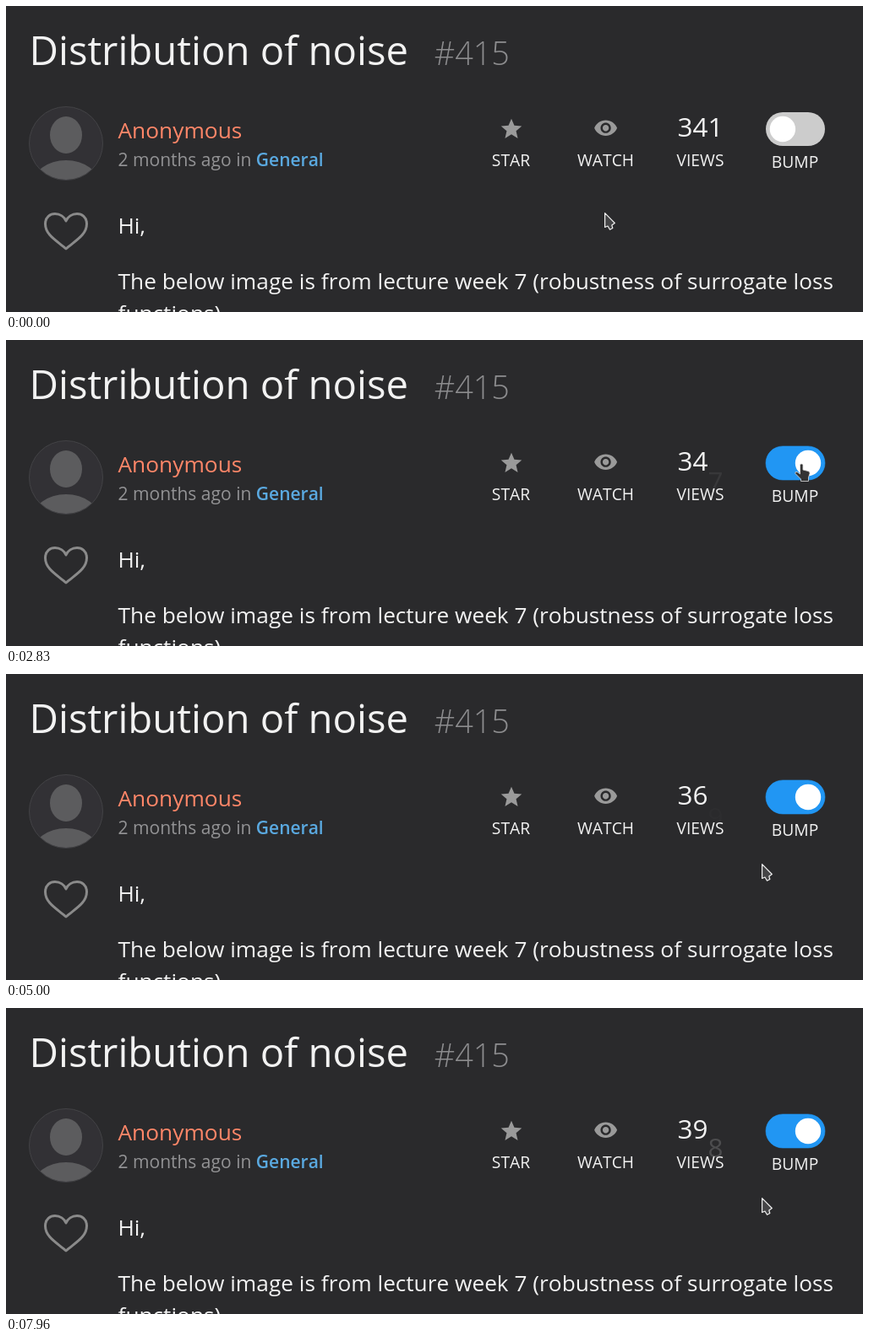
These frames come from a looping animation (1014 by 363 pixels, 8 s). An HTML page:

```html
<!DOCTYPE html>
<html lang="en">
<head>
<meta charset="utf-8">
<title>Distribution of noise</title>
<style>
  html, body { margin: 0; width: 100%; height: 100%; overflow: hidden; background: #2a2a2c; }
  svg { display: block; width: 1014px; height: 363px; }
  text { font-family: "Open Sans", sans-serif; font-kerning: none; fill: #f2f2f2; }
  .title { font-size: 47.25px; }
  .id { font-size: 37.8px; font-weight: 300; fill: #8c8c8e; }
  .body { font-size: 26.25px; }
  .author { fill: #ff8668; }
  .meta { font-size: 21px; fill: #939395; }
  .topic { font-weight: 600; fill: #5aa9e0; }
  .label { font-size: 19.25px; text-anchor: middle; }
  .count { font-size: 31.5px; }
  .icon { fill: #9a9a9a; }
</style>
</head>
<body>
<svg viewBox="0 0 1014 363">
  <defs>
    <clipPath id="round"><circle cx="71" cy="163" r="43"/></clipPath>
  </defs>

  <text class="title" x="27.5" y="70">Distribution of noise</text>
  <text class="id" x="506.8" y="70">#415</text>

  <circle cx="71" cy="163" r="43.5" fill="#323135" stroke="#434346"/>
  <g fill="#5c5c5e" clip-path="url(#round)">
    <ellipse cx="71" cy="153" rx="19" ry="22"/>
    <ellipse cx="71" cy="213" rx="40" ry="30"/>
  </g>
  <text class="body author" x="132.5" y="157">Anonymous</text>
  <text class="meta" x="132.5" y="190">2 months ago in <tspan class="topic">General</tspan></text>

  <path class="icon" transform="translate(583.3 131.2) scale(1.225)"
    d="M12 17.27L18.18 21l-1.64-7.03L22 9.24l-7.19-.61L12 2 9.19 8.63 2 9.24l5.46 4.73L5.82 21z"/>
  <path class="icon" transform="translate(694.9 130) scale(1.225)"
    d="M12 4.5C7 4.5 2.73 7.61 1 12c1.73 4.39 6 7.5 11 7.5s9.27-3.11 11-7.5c-1.73-4.39-6-7.5-11-7.5zM12 17c-2.76 0-5-2.24-5-5s2.24-5 5-5 5 2.24 5 5-2.24 5-5 5zm0-8c-1.66 0-3 1.34-3 3s1.34 3 3 3 3-1.34 3-3-1.34-3-3-3z"/>
  <text class="label" x="597.5" y="190">STAR</text>
  <text class="label" x="709.5" y="190">WATCH</text>
  <text class="label" x="821.5" y="190">VIEWS</text>
  <text class="label" x="933.5" y="192">BUMP</text>

  <g class="count">
    <text x="794.5" y="155">3</text>
    <text id="tensOld" x="812.5" y="155"></text>
    <text id="tens" x="812.5" y="155">4</text>
    <text id="onesOld" x="830.5" y="155"></text>
    <text id="ones" x="830.5" y="155">1</text>
  </g>

  <rect id="track" x="899" y="126" width="70" height="40" rx="20" fill="#ccc" stroke="#2196f3"/>
  <circle id="knob" cx="918.9" cy="146" r="15.2" fill="#fff"/>

  <path d="M71 288C61 279 46.500 272 46.500 258.500C46.500 250 52.500 246.500 58 246.500C64 246.500 69 250 71 255C73 250 78 246.500 84 246.500C89.500 246.500 95.500 250 95.500 258.500C95.500 272 81 279 71 288Z"
    fill="none" stroke="#8a8a8a" stroke-width="3" stroke-linejoin="round"/>
  <text class="body" x="132.5" y="270">Hi,</text>
  <text class="body" x="132.5" y="336">The below image is from lecture week 7 (robustness of surrogate loss</text>
  <text class="body" x="132.5" y="373.5">functions)</text>

  <path id="arrow" fill="#454547" stroke="#f0f0f0" stroke-width="1.2" stroke-linejoin="round"
    d="M.6 .6V17.500L4 16L6.500 20.200L9.800 18.500L8.800 15L12.300 12.500Z"/>
  <path id="hand" fill="#333" stroke="#ddd" stroke-width=".8" stroke-linejoin="round"
    d="M-1.500 1.500C-1.500 -.5 2 -.5 2 1.500V7L8 8.500Q10.500 9.200 10 11.500L8.500 16V20.500H-.5V18L-7 11.500Q-8 9 -5 9.500L-1.500 12Z"/>
</svg>
<script>
const LOOP = 8000, TOGGLE = 2138, COUNT = 2180, TICK = 100, ROLL = 300;
const FIRST = 341, TRAVEL = 26;
const $ = id => document.getElementById(id);
const clamp = v => Math.min(1, Math.max(0, v));
const mix = (a, b, p) => a + (b - a) * p;
const smooth = p => (1 - Math.cos(Math.PI * clamp(p))) / 2;

// time, x, y of the pointer tip
const path = [
  [330, 708, 245], [430, 733, 247], [750, 882, 245], [930, 938, 225],
  [1130, 945, 168], [1170, 943, 158], [1380, 941, 147], [2900, 941, 147],
  [3000, 945, 160], [3100, 943, 173], [3400, 896, 216], [3880, 896, 216],
  [4080, 894, 225]
];

function pointerAt(t) {
  const i = path.findIndex(k => k[0] > t);
  if (i === 0) return path[0].slice(1);
  if (i < 0) return path[path.length - 1].slice(1);
  const a = path[i - 1], b = path[i], p = (t - a[0]) / (b[0] - a[0]);
  return [mix(a[1], b[1], p), mix(a[2], b[2], p)];
}

// CSS "ease" timing curve
function ease(p) {
  let lo = 0, hi = 1;
  for (let i = 0; i < 20; i++) {
    const s = (lo + hi) / 2;
    if (.75 * s * (1 - s) + s ** 3 < p) lo = s; else hi = s;
  }
  return .3 * lo * (1 - lo) ** 2 + 3 * lo * lo * (1 - lo) + lo ** 3;
}

function place(el, digit, dy, opacity) {
  el.textContent = digit;
  el.setAttribute('transform', `translate(0 ${dy})`);
  el.setAttribute('opacity', opacity);
}

function roll(name, digit, age, oldDigit, oldAge) {
  const p = smooth(age / ROLL), q = smooth(oldAge / ROLL);
  place($(name), digit, TRAVEL * (1 - p), p);
  place($(name + 'Old'), oldDigit, -TRAVEL * q, 1 - q);
}

function drawCount(t) {
  const since = Math.max(0, t - COUNT), n = Math.floor(since / TICK);
  const value = FIRST + n, ones = value % 10, tens = Math.floor(value / 10) % 10;
  // the tens digit last changed when the ones digit was 0
  const tensAge = tens > 4 ? since - (n - ones) * TICK : ROLL;
  roll('tens', tens, tensAge, tens - 1, tensAge);
  roll('ones', ones, n ? since - n * TICK : ROLL, 1, n ? since - TICK : ROLL);
}

function drawToggle(t) {
  const p = ease(clamp((t - TOGGLE) / 400));
  const rgb = [33, 150, 243].map(c => Math.round(mix(204, c, p)));
  $('track').setAttribute('fill', `rgb(${rgb})`);
  $('track').setAttribute('stroke-opacity', p * .6);
  $('knob').setAttribute('cx', mix(918.9, 949, p));
}

function drawPointer(t) {
  const [x, y] = pointerAt(t), over = x > 899 && y < 166;
  for (const [id, on] of [['hand', over], ['arrow', !over]]) {
    $(id).setAttribute('transform', `translate(${x} ${y})`);
    $(id).setAttribute('visibility', on ? 'visible' : 'hidden');
  }
}

const start = performance.now();
function draw() {
  const t = (performance.now() - start) % LOOP;
  drawCount(t);
  drawToggle(t);
  drawPointer(t);
  requestAnimationFrame(draw);
}
draw();
</script>
</body>
</html>
```
